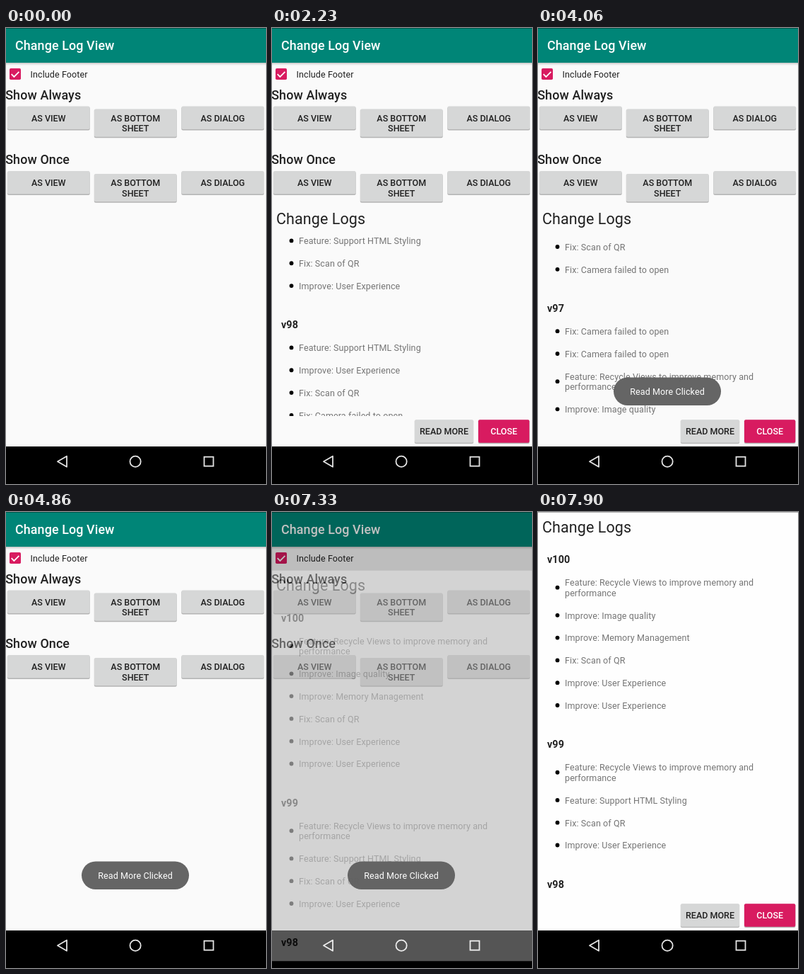
Animation of 368 by 644 pixels, one loop 8000 ms. Source, as an HTML page:

```html
<!DOCTYPE html>
<html lang="en">
<head>
<meta charset="utf-8">
<title>Change Log View</title>
<style>
html, body { margin: 0; width: 100%; height: 100%; overflow: hidden; background: #fafafa; }
svg { display: block; width: 100%; height: 100%; font-family: Roboto, sans-serif; letter-spacing: 0.1px; }
.caps { letter-spacing: 0; }
</style>
</head>
<body>
<svg id="stage" viewBox="0 0 368 644"></svg>
<script>
const LOOP = 8000;
const DP = 0.895;
const STEP = 31.8, LINE = 14.7;
const PINK = '#d81b60', GREY = '#d6d7d7', INK = '#212121';
const VIEW_Y = 248;
const NAV_Y = 591;

const FEATURE = ['Feature: Recycle Views to improve memory and', 'performance'];
const IMAGE = 'Improve: Image quality', MEMORY = 'Improve: Memory Management';
const UX = 'Improve: User Experience', SCAN = 'Fix: Scan of QR';
const HTML = 'Feature: Support HTML Styling', CAMERA = 'Fix: Camera failed to open';
const LOGS = [
  ['v100', FEATURE, IMAGE, MEMORY, SCAN, UX, UX],
  ['v99', FEATURE, HTML, SCAN, UX],
  ['v98', HTML, UX, SCAN, CAMERA],
  ['v97', CAMERA, CAMERA, FEATURE, IMAGE, MEMORY]
];

// y is the middle of the capital letters
function text(s, x, y, sp = 14, fill = INK, weight = 400, anchor = 'start') {
  const size = sp * DP;
  return `<text x="${x}" y="${(y + size * 0.356).toFixed(2)}" font-size="${size}" fill="${fill}" font-weight="${weight}" text-anchor="${anchor}">${s}</text>`;
}

function rect(x, y, w, h, fill, more = '') {
  return `<rect x="${x}" y="${y}" width="${w}" height="${h}" fill="${fill}" ${more}/>`;
}

function button(x, y, w, lines, fill = GREY, ink = INK, extra = '') {
  const h = lines.length > 1 ? 39.3 : 32.4;
  const mid = y + h / 2 + 0.5 - (lines.length - 1) * LINE / 2;
  const label = lines.map((s, i) => text(s, x + w / 2, mid + i * LINE, 14, ink, 500, 'middle'));
  return rect(x - 0.5, y + 0.3, w + 1, h + 1.2, '#000', 'rx="2.5" opacity=".1"') +
    rect(x, y + 1, w, h + 0.4, '#000', 'rx="2" opacity=".2"') + extra +
    rect(x, y, w, h, fill, 'rx="2"') + `<g class="caps">${label.join('')}</g>`;
}

function buttonRow(y) {
  return button(2, y, 116.5, ['AS VIEW']) +
    button(125, y + 3.9, 116.5, ['AS BOTTOM', 'SHEET']) +
    button(248.5, y, 116.5, ['AS DIALOG']);
}

function list() {
  let y = 67, out = '';
  for (const [version, ...items] of LOGS) {
    out += text(version, 13, y, 16, INK, 700);
    y += 32.7;
    for (const item of items) {
      const lines = [].concat(item);
      const extra = (lines.length - 1) * LINE;
      out += `<circle cx="27.5" cy="${y + extra / 2 - 0.4}" r="2.9"/>`;
      lines.forEach((s, i) => out += text(s, 38, y + i * LINE, 14, '#757575'));
      y += STEP + extra;
    }
    y += 54.7 - STEP;
  }
  return out;
}

const heading = y => text('Change Logs', 6, y + 21.3, 24);

function footer(press = '') {
  return button(202, 553.3, 83, ['READ MORE'], GREY, INK, press) +
    button(292, 553.3, 72.3, ['CLOSE'], PINK, '#fff');
}

const press = `<g id="press">${rect(202.5, 587, 82, 3.5, '#000', 'rx="2" opacity=".18"')}</g>`;

const page = rect(0, 0, 368, NAV_Y, '#fafafa') +
  rect(0, 49, 368, 1.5, '#000', 'opacity=".2"') +
  rect(0, 50.5, 368, 2, '#000', 'opacity=".06"') +
  rect(0, 0, 368, 49, '#008577') + rect(0, 0, 368, 1, '#00574b') +
  text('Change Log View', 13, 25, 20, '#fff', 500) +
  rect(5, 57, 16, 16, PINK, 'rx="1.8"') +
  '<path d="M7.7 65.2l3.7 3.7 7-7" fill="none" stroke="#fff" stroke-width="1.8"/>' +
  text('Include Footer', 34.5, 66) +
  text('Show Always', -0.8, 94.4, 20, INK, 500) + buttonRow(110.6) +
  text('Show Once', -0.8, 186, 20, INK, 500) + buttonRow(202.1);

const nav = rect(0, NAV_Y, 368, 53, '#000') +
  `<g fill="none" stroke="#e4e4e4" stroke-width="1.8">
    <path d="M73 612.3l13-7.5v15z" stroke-linejoin="round"/>
    <circle cx="183.1" cy="612.3" r="7.6"/>
    <rect x="280.5" y="605.7" width="13" height="13"/>
  </g>`;

const stage = document.getElementById('stage');
stage.innerHTML = `
  <defs>
    <clipPath id="viewClip">${rect(0, 289.5, 368, 258.5, '#000')}</clipPath>
    <clipPath id="sheetClip">${rect(0, 0, 368, 548, '#000')}</clipPath>
    <clipPath id="risingClip">${rect(0, 0, 368, 552, '#000')}</clipPath>
  </defs>
  ${page}
  <g id="ripple"><circle cx="169" cy="125.5" r="9.5" opacity=".07"/></g>
  <g id="view">
    ${heading(VIEW_Y)}
    <g clip-path="url(#viewClip)"><g id="scroller">${list()}</g></g>
    ${footer(press)}
  </g>
  ${nav}
  <g id="rising">
    ${rect(0, 0, 368, NAV_Y, '#000', 'opacity=".245"')}
    <g transform="translate(0 82.5)" opacity=".333" clip-path="url(#risingClip)">
      ${rect(0, 0, 368, 552, '#fff')}${heading(0)}${list()}
    </g>
  </g>
  <g id="sheet">
    ${rect(0, 0, 368, NAV_Y, '#fefefe')}${rect(0, 0, 368, 1, '#b4b4b4')}
    ${heading(0)}
    <g clip-path="url(#sheetClip)">${list()}</g>
    ${footer()}
  </g>
  <g id="toast">
    ${rect(107, 493.5, 152, 39.5, '#616161', 'rx="19.75" opacity=".97"')}
    ${text('Read More Clicked', 183, 514, 14, '#fff', 400, 'middle')}
  </g>`;

const part = Object.fromEntries(
  ['ripple', 'view', 'scroller', 'press', 'rising', 'sheet', 'toast']
    .map(id => [id, document.getElementById(id)]));

const show = (node, on) => node.setAttribute('visibility', on ? 'inherit' : 'hidden');

// Fling that slows down, sampled about every 200 ms
function scrollAt(t) {
  if (t < 1810) return 0;
  const k = t < 2030 ? 0 : Math.min(5, 1 + Math.floor((t - 2030) / 200));
  return 560.5 - 491 * (1 - k / 5) ** 1.7;
}

function toastAt(t) {
  if (t < 3840 || t >= 7900) return 0;
  return t < 4060 || t >= 7700 ? 0.5 : 1;
}

function render(t) {
  const within = (a, b) => t >= a && t < b;
  show(part.view, within(1010, 4860));
  part.scroller.setAttribute('transform', `translate(0 ${VIEW_Y - scrollAt(t)})`);
  show(part.press, within(3640, 3840));
  show(part.ripple, within(6680, 7330));
  show(part.rising, within(7330, 7500));
  show(part.sheet, t >= 7500);
  part.toast.setAttribute('opacity', toastAt(t));
}

const start = performance.now();
function tick() {
  render((performance.now() - start) % LOOP);
  requestAnimationFrame(tick);
}
tick();
</script>
</body>
</html>
```
